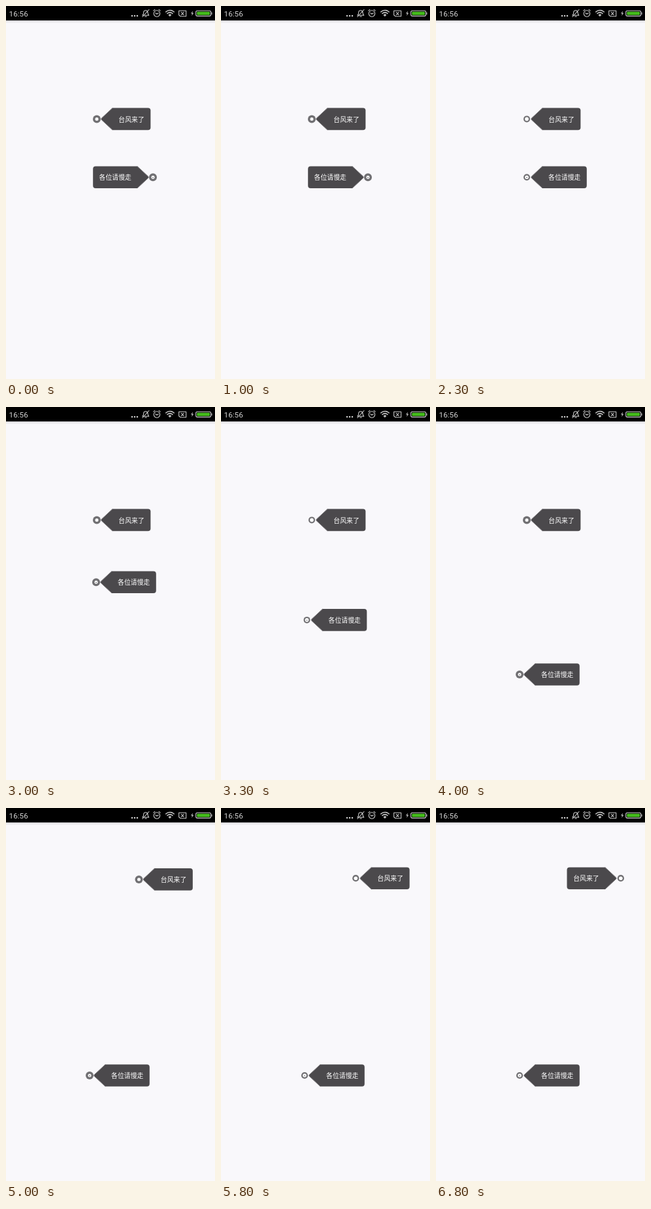
Recreate the animation shown at these times as an HTML page. Size 320 by 569 pixels, loop 6900 ms.

```html
<!DOCTYPE html>
<html lang="zh-CN">
<head>
<meta charset="utf-8">
<style>
html, body { margin: 0; width: 100%; height: 100%; overflow: hidden; background: #f9f8fb; }
svg { display: block; }
.tag text { font: 9.9px "Noto Sans CJK SC", "Noto Sans CJK", sans-serif; fill: #fff; text-anchor: middle; }
.clock { font: 11.8px Roboto, sans-serif; fill: #d2d2d2; }
.icons { fill: none; stroke: #c9c9c9; stroke-width: 1.1; stroke-linecap: round; stroke-linejoin: round; }
</style>
</head>
<body>
<svg id="stage" width="320" height="569" viewBox="0 0 320 569">
  <defs>
    <linearGradient id="shade" x2="0" y2="1">
      <stop stop-color="#d6d5d8"/><stop offset="1" stop-color="#f9f8fb"/>
    </linearGradient>
  </defs>
  <rect width="320" height="569" fill="#f9f8fb"/>
  <rect y="22" width="320" height="4" fill="url(#shade)"/>
  <rect width="320" height="22" fill="#000"/>
  <text class="clock" x="4.5" y="15.8">16:56</text>
  <g class="icons">
    <path d="M193 15h0M197 15h0M201 15h0" stroke-width="2.6"/>
    <path d="M209 14.2q1.7-1.3 1.7-4.2a3.2 3.2 0 0 1 6.4 0q0 2.900 1.7 4.200zM212.700 16h2.600M209 16.500L219 5.500"/>
    <circle cx="231" cy="11.500" r="4.700"/>
    <path d="M229 10.700l2 1.600 2.300-1.600M225.800 7.200l2.200-1.900M236.200 7.200l-2.200-1.900"/>
    <path d="M244.800 9a9 9 0 0 1 12.400 0M247 11.500a5.800 5.800 0 0 1 8 0" stroke-width="1.600"/>
    <path d="M249 13.500a3 3 0 0 1 4 0l-2 2.200z" fill="#c9c9c9" stroke-width=".6"/>
    <path d="M264.700 7.300h11v8.400h-8.500l-2.500-2zM268.500 9.700l3.600 3.600M272.100 9.700l-3.600 3.600"/>
    <path d="M286 7.500l-2.800 4h1.800l-.7 3.500 2.900-4.300h-1.900z" fill="#c9c9c9" stroke="none"/>
    <rect x="290.700" y="7.200" width="23" height="8.200" rx="2.300"/>
    <path d="M315 10v2.600"/>
    <rect x="292.300" y="8.800" width="19.800" height="5" rx="1" fill="#45bd1c" stroke="none"/>
  </g>
</svg>
<script>
const LOOP = 6900, STEP = 100;
const stage = document.getElementById('stage');

// drag: [time, dx, dy] points; flipped(t): true when the dot sits on the right
const tags = [
  { label: '台风来了', x: 177.3, y: 172.4, half: 44.3, flipped: t => t >= 5900,
    drag: [[4700, 0, 0], [4800, 12, -12], [4900, 42, -42], [5000, 64.5, -63.5], [5400, 67.3, -65.2]] },
  { label: '各位请慢走', x: 182, y: 261.2, half: 49, marked: true, flipped: t => t < 1700,
    drag: [[2900, 0, 0], [3000, -1, 6], [3300, -7.5, 63.7], [3600, -10.5, 112], [3800, -11.5, 140], [3900, -11, 146.8]] }
];

function build(tag) {
  const tip = 12 - tag.half, shoulder = tip + 18, right = tag.half - .2, h = 16.8;
  const slant = `M${shoulder} ${-h}L${tip + 1.3} -1.3Q${tip} 0 ${tip + 1.3} 1.3L${shoulder} ${h}`;
  const g = document.createElementNS('http://www.w3.org/2000/svg', 'g');
  g.setAttribute('class', 'tag');
  g.innerHTML = `<g class="shape">
      <path d="${slant}H${right - 4}q4 0 4 -4V${4 - h}q0 -4 -4 -4z" fill="#4b494c"/>
      <path d="${slant}" fill="none" stroke="#858386" stroke-width=".9"/>
      <g transform="translate(${6 - tag.half})">
        <circle class="ring" fill="#717073"/><circle class="core" fill="#fff"/>
        ${tag.marked ? '<rect x="-1" y="-.2" width="2" height="1.2" fill="#858487"/>' : ''}
      </g>
    </g><text y="4.2">${tag.label}</text>`;
  stage.append(g);
  tag.node = g;
  [tag.shape, tag.ring, tag.core, tag.text] =
    ['.shape', '.ring', '.core', 'text'].map(s => g.querySelector(s));
}

function along(points, t) {
  const i = points.findIndex(p => p[0] > t);
  if (i === 0) return [0, 0];
  if (i < 0) return points[points.length - 1].slice(1);
  const a = points[i - 1], b = points[i], k = (t - a[0]) / (b[0] - a[0]);
  return [1, 2].map(n => a[n] + (b[n] - a[n]) * k);
}

function pulse(t) {
  const phase = t % 1000;
  return phase < 300 ? 6 : phase < 500 ? 5 : phase < 800 ? 4.6 : 5.1;
}

function draw(now) {
  const t = Math.floor(now % LOOP / STEP) * STEP, r = pulse(t);
  for (const tag of tags) {
    const [dx, dy] = along(tag.drag, t), side = tag.flipped(t) ? -1 : 1;
    tag.node.setAttribute('transform', `translate(${tag.x + dx} ${tag.y + dy})`);
    tag.shape.setAttribute('transform', `scale(${side} 1)`);
    tag.text.setAttribute('x', 14.7 * side);
    tag.ring.setAttribute('r', r);
    tag.core.setAttribute('r', r > 5.5 ? 2.5 : 2.8);
  }
}

tags.forEach(build);
const start = performance.now();
function tick() {
  draw(performance.now() - start);
  requestAnimationFrame(tick);
}
tick();
</script>
</body>
</html>
```
